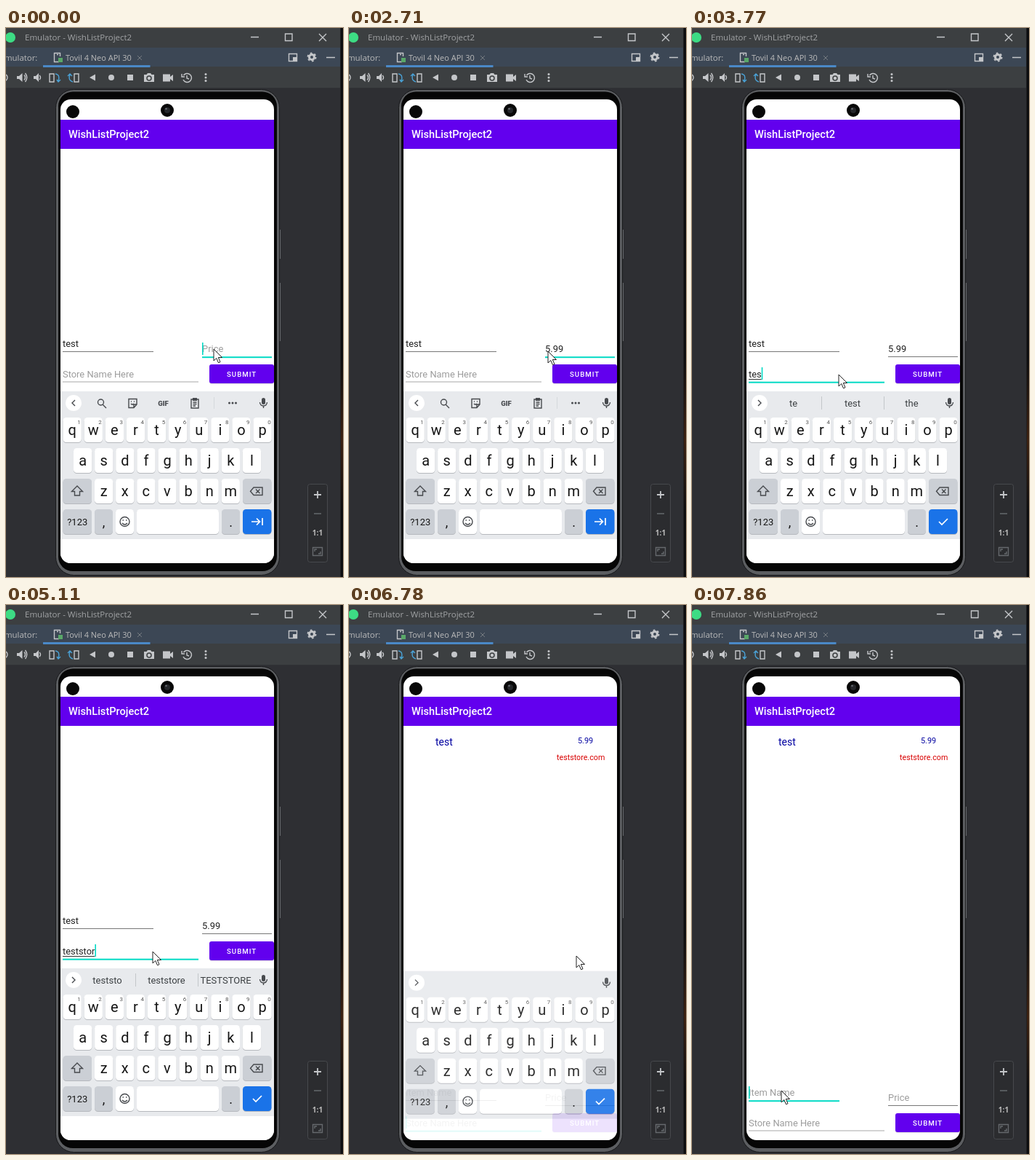
These frames come from a looping animation (464 by 754 pixels, 8000 ms). An HTML page:

```html
<!DOCTYPE html>
<html lang="en">
<head>
<meta charset="utf-8">
<title>Emulator</title>
<style>
  html, body { margin: 0; height: 100%; overflow: hidden; background: #2e2f33; }
  svg { display: block; width: 464px; height: 754px; font-family: Roboto, sans-serif; }
  .ui { font: 11.4px "Open Sans", sans-serif; fill: #bbb; }
  .field { font-size: 12.9px; fill: #222; }
  .hint { fill: #9c9c9c; }
  .line { fill: none; stroke: #c4c6c9; stroke-width: 1.4; }
  .dark { stroke: #474a4e; }
  .solid { fill: #c4c6c9; }
  .mid { text-anchor: middle; }
  .word { font-size: 13px; fill: #3c4043; text-anchor: middle; }
</style>
</head>
<body>
<svg viewBox="0 0 464 754">
  <defs>
    <clipPath id="screen"><rect x="75" y="98" width="294" height="637" rx="14"/></clipPath>
    <linearGradient id="edge" x2="0" y2="1">
      <stop offset=".6" stop-color="#0d0d0f"/><stop offset=".75" stop-color="#3c2110"/><stop offset=".88" stop-color="#0d0d0f"/>
    </linearGradient>
  </defs>
  <rect width="464" height="754" fill="#2e2f33"/>
  <rect width="464" height="82" fill="#3c3f41"/>
  <rect y="27" width="464" height="26" fill="#3c4755"/>
  <path d="M0 82.500H460" stroke="#303236"/>
  <rect x="460" width="1" height="754" fill="#222326"/>
  <rect x="461" width="3" height="754" fill="url(#edge)"/>

  <!-- Window title and tab -->
  <circle cx="6" cy="13" r="7" fill="#3ddc84"/>
  <text class="ui" x="26" y="17" style="font-size:11.500px;fill:#a2a4a6">Emulator - WishListProject2</text>
  <path class="line" stroke-width="1" d="M337 12.500H348M384.500 8V17.500H394V8ZM431 8L441 18M441 8L431 18"/>
  <text class="ui" x="-2" y="45">mulator:</text>
  <rect x="51" y="51" width="147.500" height="3" fill="#4a88c7"/>
  <path class="line" d="M73 46.500H66.500V34.500H74.500V39M70 36.500H72"/>
  <rect x="72" y="41" width="6" height="6" fill="#59a869"/>
  <text class="ui" x="82" y="45" style="font-size:11px">Tovil 4 Neo API 30</text>
  <path class="line" style="stroke:#777c82;stroke-width:1" d="M181 38L187 44M187 38L181 44"/>
  <path class="line" d="M389.500 35.500H400.500V45.500H389.500ZM441 40.500H453"/>
  <rect class="solid" x="395" y="40" width="5" height="5"/>
  <circle class="line" cx="421" cy="40" r="3.500" style="stroke-width:3"/>
  <circle class="line" cx="421" cy="40" r="5.500" style="stroke-width:2;stroke-dasharray:2.600 3.160"/>

  <!-- Device toolbar -->
  <path class="line" d="M-3 63A5 5 0 1 1 -3 73M25 64.500Q28 68 25 71.500M26.500 62Q31 68 26.500 74M46 65Q49 68 46 71"/>
  <path class="solid" d="M15 66H18L22.500 62V74L18 70H15ZM38 66H41L45 62V74L41 70H38ZM123 63.500V72.500L115 68ZM167 64H175V72H167Z"/>
  <path class="line" d="M60 63H66V74H60ZM94 63H100V74H94Z"/>
  <path class="line" style="stroke:#4aa3d8" d="M68 63Q75 64 72 73M70 71L72 74 75 71M92 74Q85 72 88 64M85 66L88 63 91 66"/>
  <circle class="solid" cx="145" cy="68" r="4"/>
  <path class="solid" d="M190 64H193.500L195 62H199L200.500 64H204V74H190ZM216 63.500H226V67L230 64V73L226 70V73.500H216Z"/>
  <circle cx="197" cy="69" r="3" fill="none" stroke="#3c3f41" stroke-width="1.500"/>
  <path class="line" d="M244.500 65A6 6 0 1 1 244 71M242 63V67H246M249 65V69L252 70"/>
  <g class="solid"><circle cx="275" cy="63.500" r="1.500"/><circle cx="275" cy="68" r="1.500"/><circle cx="275" cy="72.500" r="1.500"/></g>

  <!-- Zoom panel -->
  <rect x="415.500" y="626.500" width="27" height="107" rx="3" fill="#2b2c2f" stroke="#47494d"/>
  <path class="line" style="stroke-width:1.800" d="M424 641H434M429 636V646"/>
  <path class="line" style="stroke:#66696d" d="M424 667H434M422.500 713.500H435.500V724.500H422.500ZM425 719V716H428M433 719V722H430"/>
  <text class="ui mid" x="429" y="697" style="font-size:10px;font-weight:700">1:1</text>

  <!-- Phone: metal rim, black bezel, screen -->
  <path d="M377 277V317M377 350V430" stroke="#6a6c70" stroke-width="2"/>
  <rect x="68.500" y="84.500" width="308" height="667" rx="25" fill="#5c5e61" stroke="#18191b"/>
  <rect x="72" y="87.500" width="301" height="658.500" rx="20" fill="#060606"/>
  <g clip-path="url(#screen)">
    <rect x="75" y="98" width="294" height="637" fill="#fff"/>
    <rect x="75" y="126" width="294" height="40" fill="#6200ee"/>
    <text x="86" y="151" font-size="14.600" font-weight="500" fill="#fff">WishListProject2</text>
    <g id="list" fill="#0000a0">
      <text x="119" y="193" font-size="14">test</text>
      <text x="315" y="190" font-size="10.900">5.99</text>
      <text x="286" y="213" font-size="10.700" fill="#d80000">teststore.com</text>
    </g>
    <g id="form">
      <text id="item" x="78" y="438"/><rect id="itemLine" x="78" width="125"/>
      <text id="price" x="270" y="445"/><rect id="priceLine" x="270" width="96"/>
      <text id="store" x="78" y="480"/><rect id="storeLine" x="78" width="187"/>
      <rect id="composing" x="78" y="482" height="1" fill="#333"/>
      <rect id="caret" width="1.600" height="17" fill="#03dac5"/>
      <rect x="280" y="463" width="89" height="26" rx="3" fill="#0002"/>
      <rect x="280" y="462" width="89" height="26" rx="3" fill="#6200ee"/>
      <text x="304" y="479" font-size="9.700" font-weight="500" letter-spacing="1" fill="#fff">SUBMIT</text>
    </g>
    <g id="keyboard">
      <rect x="75" y="499" width="294" height="240" fill="#fff"/>
      <rect x="75" y="499" width="294" height="203" fill="#e8eaed"/>
      <circle cx="93" cy="515" r="11" fill="#fff"/>
      <path id="chevron" class="line dark"/>
      <g id="icons">
        <path class="line dark" d="M133 517L138 522M169 509.500H180V517L176 521.500H169ZM176 521V517H180M172 513H173M176 513H177M172 516Q174 518 176 516M255 510H265V522H255ZM257.500 514H262.500M257.500 516.500H262.500M257.500 519H261"/>
        <circle class="line dark" cx="130.500" cy="514" r="4"/>
        <rect x="257" y="508" width="6" height="4" fill="#474a4e"/>
        <text class="mid" x="216.500" y="518.500" font-size="9.600" font-weight="900" fill="#474a4e">GIF</text>
        <path d="M286.500 507V523" stroke="#d5d8dc"/>
        <g fill="#474a4e"><circle cx="307.500" cy="515" r="1.500"/><circle cx="312" cy="515" r="1.500"/><circle cx="316.500" cy="515" r="1.500"/></g>
      </g>
      <g id="words">
        <path d="M178.500 506V524M264.500 506V524" stroke="#c3c6ca"/>
        <text class="word" x="139.500" y="520"/><text class="word" x="221" y="520"/><text class="word" x="302.500" y="520"/>
      </g>
      <rect x="352" y="508" width="5" height="9" rx="2.500" fill="#474a4e"/>
      <path class="line dark" d="M349.500 514Q350 519 354.500 519T359.500 514M354.500 519V522"/>
      <g id="keys"></g>
      <path class="line dark" d="M98 629L105.500 636.500H101.500V642H94.500V636.500H90.500ZM341 631H353V641.500H341L336.500 636.200ZM344 633.500L349.500 639M349.500 633.500L344 639"/>
      <circle class="line dark" cx="163.500" cy="678" r="6.500"/>
      <path class="line dark" d="M160.500 676H162M165 676H166.500M160 680Q163.500 684 167 680"/>
      <path id="action" class="line" style="stroke:#fff;stroke-width:1.700"/>
    </g>
  </g>
  <circle cx="92" cy="115" r="9" fill="#080808"/>
  <circle cx="222" cy="113" r="9" fill="#080808"/>
  <circle cx="222" cy="113" r="4" fill="#25272b"/><circle cx="220.500" cy="111" r="1.300" fill="#666a70"/>
  <path id="mouse" d="M0 0V16L3.800 12.500 6.500 18.800 9 17.700 6.300 11.500H11.500Z" fill="#fff" stroke="#222" stroke-width="1"/>
</svg>
<script>
const $ = id => document.getElementById(id);
const LOOP = 8000, SUBMIT = 6660, TEAL = '#03dac5';

// Keys
const key = (x, y, w, fill, label = '', size = 20, dy = 24) =>
  `<rect x="${x}" y="${y + 1}" width="${w}" height="34" rx="4.500" fill="#b6b9be"/>
   <rect x="${x}" y="${y}" width="${w}" height="34" rx="4.500" fill="${fill}"/>
   <text class="mid" x="${x + w / 2}" y="${y + dy}" font-size="${size}" fill="#151515">${label}</text>`;
const row = (letters, x, y) =>
  [...letters].map((c, i) => key(x + i * 29.1, y, 25.3, '#fff', c)).join('');
const GREY = '#cbcfd5';
$('keys').innerHTML =
  row('qwertyuiop', 78.5, 535) + row('asdfghjkl', 93, 577) + row('zxcvbnm', 122, 619) +
  [...'1234567890'].map((d, i) =>
    `<text class="mid" x="${100.5 + i * 29.1}" y="544" font-size="8" fill="#555">${d}</text>`).join('') +
  key(78.5, 619, 39.5, GREY) + key(326, 619, 39.5, GREY) +
  key(78.5, 661, 39.5, GREY, '?123', 13, 22) + key(122, 661, 25, GREY, ',', 18) +
  key(151, 661, 25, '#fff') + key(180, 661, 113, '#fff') +
  key(297, 661, 25, GREY, '.', 18) + key(326, 661, 39.5, '#1a73e8');

// Timelines: [start, value], each held until the next
const price = [[0, ''], [370, '5'], [770, '5.'], [2060, '5.9'], [2180, '5.99'], [SUBMIT, '']];
const store = [[0, ''], [3620, 't'], [3770, 'tes'], [4050, 'test'], [4440, 'tests'], [4590, 'testst'],
  [4870, 'teststo'], [5110, 'teststor'], [5230, 'teststore'], [5340, 'teststore.'],
  [5450, 'teststore.c'], [5560, 'teststore.co'], [5680, 'teststore.com'], [SUBMIT, '']];
const item = [[0, 'test'], [SUBMIT, '']];
const focus = [[0, 'price'], [3230, 'store'], [7590, 'item']];
const strip = [[0, 'icons'], [1040, ''], [1290, 'icons'], [3620, 't to thanks'], [3770, 'te test the'],
  [4050, 'tes test the'], [4170, 'test testing the'], [4440, 'tests test testing'],
  [4870, 'testst teststo TESTSTO'], [5110, 'teststo teststore TESTSTORE'], [5340, 'icons'], [SUBMIT, '']];
const mouse = [[0, [286, 441]], [2710, [274, 444]], [2840, [252, 456]], [2970, [222, 470]], [3100, [202, 476]],
  [6210, [210, 470]], [6330, [252, 464]], [6440, [300, 472]], [6560, [313, 482]], [7050, [300, 496]],
  [7170, [250, 533]], [7320, [190, 590]], [7450, [145, 640]], [7590, [123, 667]]];
const step = (list, t) => list.findLast(e => e[0] <= t);
const at = (list, t) => step(list, t)[1];

const fields = {
  item: { text: item, hint: 'Item Name', lineY: 444, top: 425, rest: '#777' },
  price: { text: price, hint: 'Price', lineY: 451, top: 432, rest: '#777' },
  store: { text: store, hint: 'Store Name Here', lineY: 485.5, top: 466, rest: '#a8a8a8' }
};
const set = (id, attrs) => { for (const k in attrs) $(id).setAttribute(k, attrs[k]); };
const show = (id, on) => { $(id).style.display = on ? '' : 'none'; };

function draw(t) {
  const done = t >= SUBMIT, active = at(focus, t);
  show('list', done);
  set('form', { transform: `translate(0 ${done ? 236 : 0})` });

  for (const id in fields) {
    const f = fields[id], value = at(f.text, t), on = id === active;
    $(id).textContent = value || f.hint;
    set(id, { class: value ? 'field' : 'field hint' });
    set(id + 'Line', { y: on ? f.lineY + .2 : f.lineY, height: on ? 2 : 1, fill: on ? TEAL : f.rest });
    if (!on) continue;
    const width = value ? $(id).getComputedTextLength() : 0;
    const since = t - Math.max(step(f.text, t)[0], step(focus, t)[0]);
    set('caret', { x: +$(id).getAttribute('x') + width, y: f.top });
    show('caret', since % 920 < 520);
    set('composing', { width });
    show('composing', id === 'store' && value && t < 5340);
  }

  // Keyboard strip, action key and closing
  const mode = at(strip, t), icons = mode === 'icons';
  show('icons', icons);
  show('words', mode && !icons);
  document.querySelectorAll('.word').forEach((w, i) => { w.textContent = mode.split(' ')[i] || ''; });
  set('chevron', { d: icons ? 'M95 511L91 515 95 519' : 'M91 511L95 515 91 519' });
  set('action', { d: active === 'price'
    ? 'M338 678H349M345 673.500L349.500 678 345 682.500M353 673V683' : 'M340 678L344 682 352 674' });
  const gone = Math.min(1, Math.max(0, (t - 6680) / 300)) ** 2;
  set('keyboard', { opacity: 1 - gone, transform: `translate(0 ${32 * gone})` });

  set('mouse', { transform: `translate(${at(mouse, t)})` });
}

function tick() {
  draw(performance.now() % LOOP);
  requestAnimationFrame(tick);
}
tick();
</script>
</body>
</html>
```
